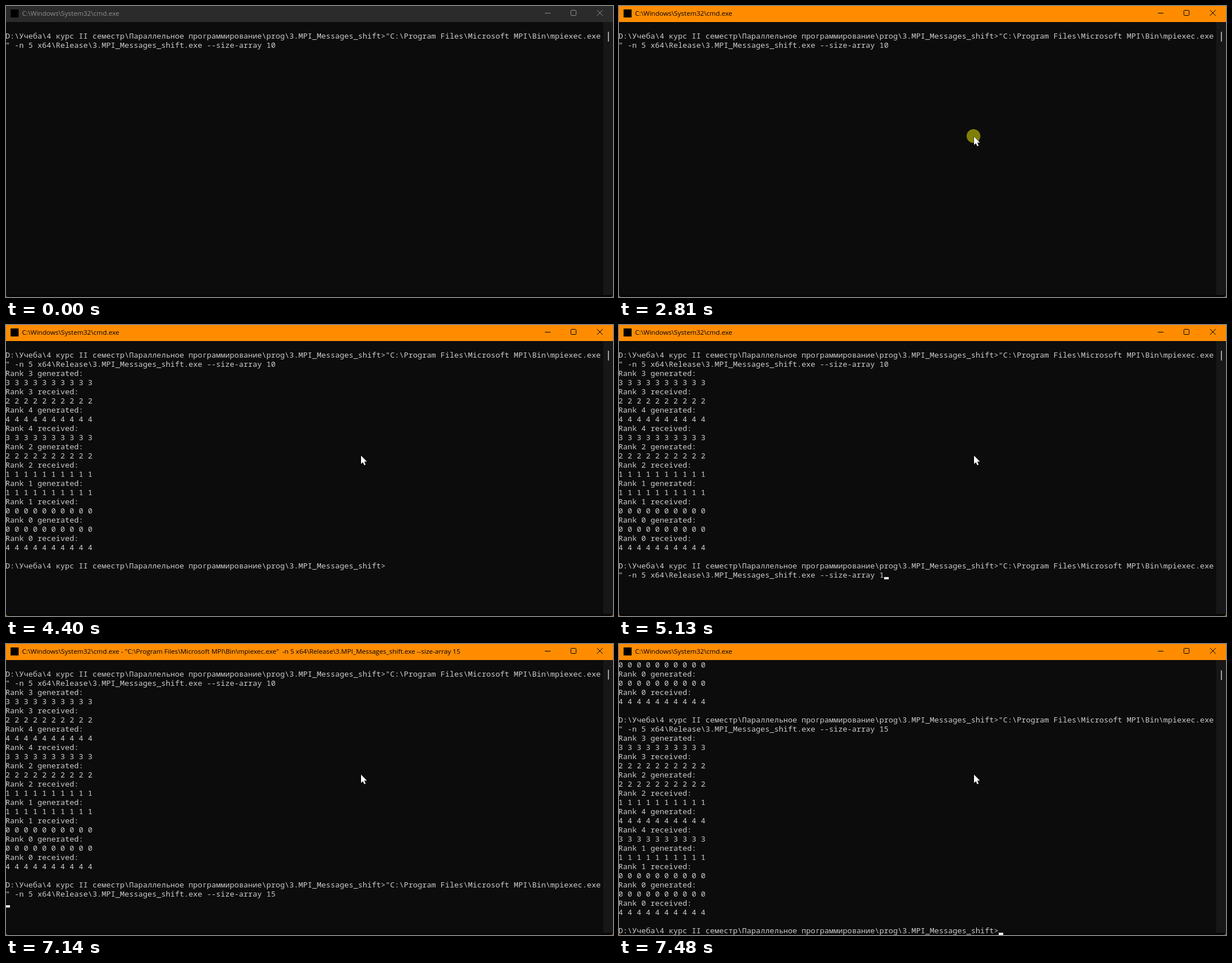
Write an HTML page with a canvas that moves like this. It is 1060 px wide and 508 px high and loops after 8000 ms.

```html
<!DOCTYPE html>
<html lang="ru">
<head>
<meta charset="utf-8">
<title>Console</title>
<style>
html, body { margin: 0; width: 100%; height: 100%; overflow: hidden; background: #0c0c0c; }
canvas { display: block; }
</style>
</head>
<body>
<canvas id="stage" width="1060" height="508"></canvas>
<script>
const ctx = document.getElementById('stage').getContext('2d');
const W = 1060, H = 508, LOOP = 8000, COL = 8, ROW = 16, TOP = 28;

const shell = 'C:\\Windows\\System32\\cmd.exe';
const prompt = 'D:\\Учеба\\4 курс II семестр\\Параллельное программирование\\prog\\3.MPI_Messages_shift>';
const exe = '"C:\\Program Files\\Microsoft MPI\\Bin\\mpiexec.exe';
const args = ' -n 5 x64\\Release\\3.MPI_Messages_shift.exe --size-array ';

// Each rank prints its own values, then those of its left neighbour.
const output = ranks => ranks.flatMap(r => [
  `Rank ${r} generated:`, `${r} `.repeat(10),
  `Rank ${r} received:`, `${(r + 4) % 5} `.repeat(10)
]);
const command = size => [prompt + exe, '"' + args + size];
const firstRun = ['', ...command('10'), ...output([3, 4, 2, 1, 0]), ''];
const secondRun = [...firstRun, ...command('15'), ...output([3, 2, 4, 1, 0]), ''];

const within = (t, from, to) => t >= from && t < to;

function consoleAt(t) {
  if (t < 3670) return { lines: firstRun.slice(0, 3), caret: t >= 3410 && [0, 3] };
  if (t < 4600) return { lines: [...firstRun, prompt], caret: t < 4400 && [83, 24] };
  if (t < 7410) {
    const size = t < 5130 ? '10' : t < 6610 ? '1' : '15';
    const on = !within(t, 4930, 5130) && !within(t, 5460, 5990) &&
               !within(t, 6540, 6610) && !within(t, 7070, 7140);
    return {
      lines: [...firstRun, ...command(size)],
      caret: on && (t < 7140 ? [57 + size.length, 25] : [0, 26])
    };
  }
  const done = t >= 7480;
  return {
    lines: [...secondRun, done ? prompt : ''].slice(18),
    caret: done && [83, 29],
    scrolled: done
  };
}

function titleAt(t) {
  const size = within(t, 3340, 3670) ? '10' : within(t, 7070, 7480) ? '15' : '';
  return size ? `${shell} - ${exe}" ${args}${size}` : shell;
}

function box(color, x, y, w, h) {
  ctx.fillStyle = color;
  ctx.fillRect(x, y, w, h);
}

function text(font, color, str, x, y) {
  ctx.font = font;
  ctx.fillStyle = color;
  ctx.fillText(str, x, y);
}

function drawFrame(t) {
  const active = t >= 2810;
  const ink = active ? '#000' : '#8f8f8f';
  box(active ? '#ff8c00' : '#2b2b2b', 0, 0, W, TOP);
  box('#000', 8, 6, 14, 14);
  text('11.6px "Open Sans", sans-serif', ink, titleAt(t), 28, 17);

  ctx.strokeStyle = ink;
  ctx.lineWidth = 1;
  ctx.beginPath();
  ctx.moveTo(941, 12.5);
  ctx.lineTo(951, 12.5);
  ctx.roundRect(986.5, 7.5, 9, 9, 1);
  ctx.moveTo(1032, 7);
  ctx.lineTo(1042, 17);
  ctx.moveTo(1042, 7);
  ctx.lineTo(1032, 17);
  ctx.stroke();

  ctx.fillStyle = active ? '#8a5010' : '#484848';
  for (const x of [0, W]) {
    const inner = Math.abs(x - 5);
    ctx.beginPath();
    ctx.moveTo(x, H - 5);
    ctx.quadraticCurveTo(x, H, x ? W - 5 : inner, H);
    ctx.lineTo(x, H);
    ctx.fill();
  }
}

function drawConsole({ lines, caret, scrolled }) {
  box('#0c0c0c', 0, TOP, W, H - TOP);
  box('#060606', 0, 505, W, 3);
  box('#171717', 1043, TOP, 17, 476);
  box('#9f9f9f', 1051, scrolled ? 46 : 45, 2, 17);
  lines.forEach((line, i) =>
    text('13.3333px "Noto Sans Mono", monospace', '#ccc', line, -1, TOP + 13 + i * ROW));
  if (caret) box('#f2f2f2', caret[0] * COL - 1, TOP + caret[1] * ROW + 12, COL, 4);
}

function drawPointer(t) {
  if (t < 70) return;
  if (within(t, 2810, 2940)) {
    ctx.fillStyle = '#807f08';
    ctx.beginPath();
    ctx.arc(619, 227, 12, 0, 7);
    ctx.fill();
  }
  // The pointer was sampled about every 66 ms, slowing as it arrives.
  const left = 1 - Math.min(1, Math.floor((t - 70) / 66.25) / 8);
  const ease = left * left;
  const x = t < 800 ? Math.round(621 + 310 * ease) : 620;
  const y = Math.round(228 + 270 * ease);
  ctx.save();
  ctx.translate(x, y);
  const arrow = new Path2D('M0 0V14.5L3.3 11.4L5.6 16.8L8 15.8L5.7 10.5H10.3Z');
  ctx.strokeStyle = '#000';
  ctx.lineWidth = 1;
  ctx.stroke(arrow);
  ctx.fillStyle = '#fff';
  ctx.fill(arrow);
  ctx.restore();
}

function render(now) {
  const t = now % LOOP;
  drawConsole(consoleAt(t));
  drawFrame(t);
  drawPointer(t);
  requestAnimationFrame(render);
}
render(0);
</script>
</body>
</html>
```
